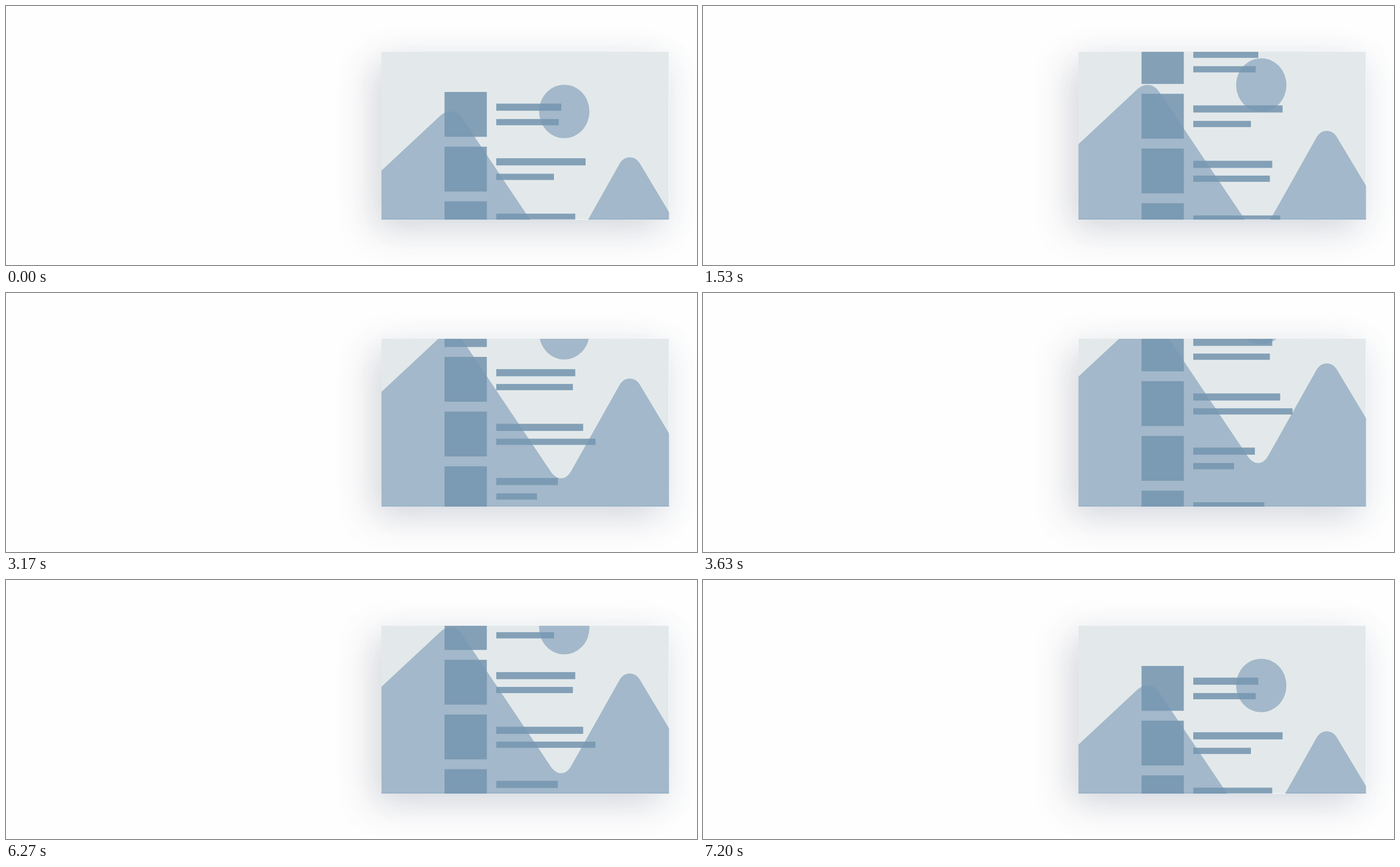
Animation of 1222x458 px, one loop 8030 ms. Source, as an HTML page:

```html
<!DOCTYPE html>
<html lang="en">
<head>
<meta charset="utf-8">
<title>Parallax scroll</title>
<style>
html, body { margin: 0; width: 100%; height: 100%; overflow: hidden; background: #fefefe; }
.shadow {
  position: absolute; left: 664px; top: 81px; width: 508.5px; height: 296.5px;
  box-shadow: -18px 18px 60px rgba(45, 55, 80, .17), 10px 12px 55px rgba(70, 115, 170, .06);
}
svg { position: absolute; left: 0; top: 0; display: block; }
</style>
</head>
<body>
<div class="shadow"></div>
<svg width="1222" height="458" viewBox="0 0 1222 458">
  <defs>
    <clipPath id="card"><rect x="664" y="81" width="508.5" height="296.5"/></clipPath>
    <clipPath id="rim"><rect x="664" y="376.2" width="508.5" height="1.3"/></clipPath>
    <path id="hills" d="M660 294.7L768 194C780 182.8 796.5 183.3 806 197.5L963 431.5
      C974.2 448.2 989.9 448.2 999.5 431L1085 279C1093.5 263.8 1112.5 263.8 1121 278.5
      L1180 377V700H660Z"/>
  </defs>
  <g clip-path="url(#card)">
    <rect x="664" y="81" width="508.5" height="296.5" fill="#e3e9ea"/>
    <g class="back" fill="#a3b8ca">
      <use href="#hills"/>
      <ellipse cx="987.3" cy="186.5" rx="44.5" ry="47.3"/>
    </g>
    <g id="list" fill="#7696b0" fill-opacity=".875"></g>
  </g>
  <g clip-path="url(#rim)">
    <use class="back" href="#hills" fill="#5580a8" fill-opacity=".35"/>
  </g>
</svg>
<script>
const LOOP = 8030, FRAME = 100 / 3, LEAD = 22;
const list = document.getElementById('list');
const backs = document.querySelectorAll('.back');

// Per row: offset of the first bar, then both bar widths
const rows = [
  [20.6, 115, 110.5], [20.5, 158, 102], [21.7, 139.7, 135.5],
  [21.6, 153.7, 175.5], [20.6, 109, 72], [20.6, 125.7, 100]
];

function addRect(x, y, width, height) {
  const el = document.createElementNS('http://www.w3.org/2000/svg', 'rect');
  for (const [name, value] of Object.entries({ x, y, width, height })) el.setAttribute(name, value);
  list.append(el);
}

rows.forEach(([dy, first, second], i) => {
  const y = 152 + 96.75 * i;
  addRect(775.5, y, 74.8, 79.3);
  addRect(867, y + dy, first, 12.6);
  addRect(867, y + 47.9, second, 11);
});

const expoOut = x => x >= 1 ? 1 : 1 - 2 ** (-10 * x);
const expoInOut = x => x >= 1 ? 1 : x < .5 ? 2 ** (20 * x - 10) / 2 : 1 - 2 ** (10 - 20 * x) / 2;

const moves = [
  { start: 500, time: 500, to: 68, ease: expoOut },
  { start: 1500, time: 1000, to: 148, ease: expoOut },
  { start: 3000, time: 1500, to: 293.3, ease: expoOut },
  { start: 5500, time: 1700, to: 0, ease: expoInOut }
];

function scrollAt(t) {
  let pos = 0;
  for (const { start, time, to, ease } of moves) {
    if (t > start) pos += (to - pos) * ease((t - start) / time);
  }
  return pos;
}

function draw(ms) {
  const t = Math.floor((ms % LOOP + 4) / FRAME) * FRAME + LEAD;
  const pos = scrollAt(t);
  list.setAttribute('transform', `translate(0 ${-pos})`);
  backs.forEach(el => el.setAttribute('transform', `translate(0 ${-pos / 2})`));
}

const begin = performance.now();
function tick() {
  draw(performance.now() - begin);
  requestAnimationFrame(tick);
}
tick();
</script>
</body>
</html>
```
